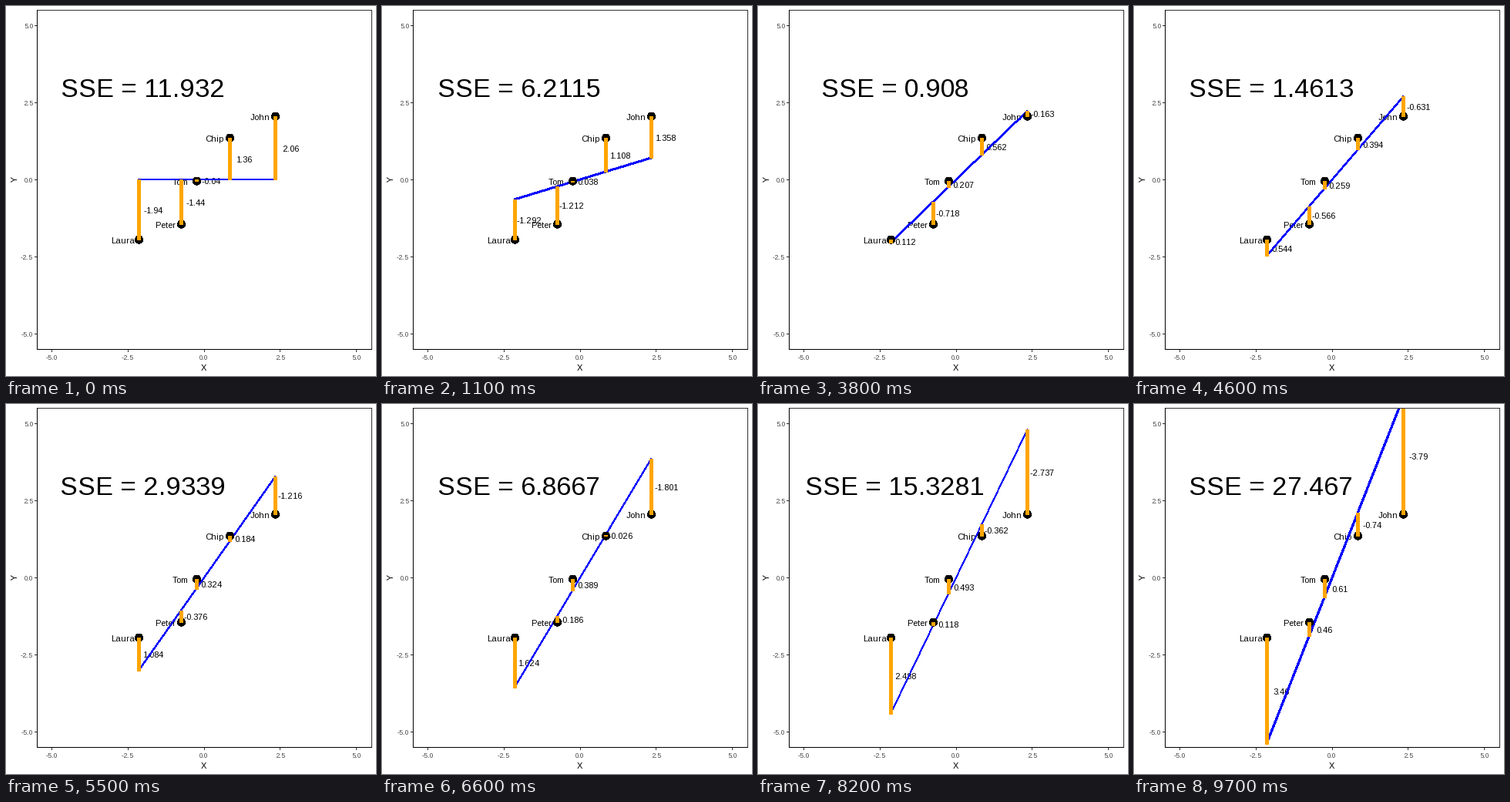
Recreate the animation shown at these times as a matplotlib script. Size 480 by 480 pixels, loop 10 s.

```python
import matplotlib.pyplot as plt
import numpy as np
from matplotlib.animation import FuncAnimation
from matplotlib.patches import Circle, Rectangle

plt.rcParams["font.family"] = "Liberation Sans"
plt.rcParams["text.hinting"] = "force_autohint"
plt.rcParams["text.hinting_factor"] = 1

SIZE, DPI = 480, 72  # at 72 dpi one point is one pixel
NAMES = ["Laura", "Peter", "Tom", "Chip", "John"]
X = np.array([-2.16, -0.76, -0.26, 0.84, 2.34])
Y = np.array([-1.94, -1.44, -0.04, 1.36, 2.06])
LEFT, TOP, RIGHT, BOTTOM = 40.5, 5.5, 474.5, 445.5


def px(x):
    return 257.15 + 39.45 * x


def py(y):
    return 225.5 - 40 * y


def column(x):
    """Centre of the pixel column at x."""
    return round(px(x)) + 0.5


def short(value, digits):
    text = f"{value:.{digits}f}".rstrip("0").rstrip(".")
    return "0" if text == "-0" else text


fig = plt.figure(figsize=(SIZE / DPI, SIZE / DPI), dpi=DPI, facecolor="white")
ax = fig.add_axes([0, 0, 1, 1])
ax.set(xlim=(0, SIZE), ylim=(SIZE, 0))
ax.axis("off")
panel = Rectangle((LEFT, TOP), RIGHT - LEFT, BOTTOM - TOP, fc="none", ec="none")
ax.add_patch(panel)


def baseline(y, size):
    return y + 0.36 * size + 0.6


def label(x, y, text, size=11, color="black", ha="center"):
    return ax.text(x - 0.5, baseline(y, size), text, fontsize=size,
                   color=color, ha=ha, va="baseline", zorder=1)


def stroke(xs, ys, color, width, z):
    line, = ax.plot(xs, ys, color=color, lw=width, zorder=z, snap=False,
                    solid_capstyle="butt", antialiased=False)
    return line


# Panel frame and axes
GREY = "#333333"
stroke([LEFT, RIGHT], [TOP, TOP], GREY, 1, 5)
stroke([RIGHT, RIGHT], [TOP, BOTTOM], GREY, 1, 5)
stroke([LEFT, LEFT], [TOP - 0.5, BOTTOM + 0.5], "black", 1, 6)
stroke([LEFT - 0.5, RIGHT + 0.5], [BOTTOM, BOTTOM], "black", 1, 6)
for v in np.arange(-5, 5.1, 2.5):
    tx, ty = np.floor(px(v)) + 0.5, py(v)
    stroke([tx, tx], [BOTTOM + 0.5, BOTTOM + 3.5], GREY, 1, 5)
    stroke([LEFT - 3.5, LEFT - 0.5], [ty, ty], GREY, 1, 5)
    label(px(v), 455, f"{v:.1f}", 9, "#4d4d4d")
    label(35.5, ty, f"{v:.1f}", 9, "#4d4d4d", "right")
label(256.5, 468, "X")
ax.text(17, 225.5, "Y", fontsize=11, rotation=90, ha="right", va="center")

# Data points with names
for name, x, y in zip(NAMES, X, Y):
    label(px(x - 0.5), py(y), name)
    ax.add_patch(Circle((column(x), py(y)), 5, fc="black", ec="none",
                        antialiased=False, zorder=3))

# Moving parts
sse = label(px(-2), py(3), "", 34.1)
fit = stroke([], [], "blue", 2, 2)
bars = [stroke([], [], "orange", 5, 4) for _ in X]
gaps = [label(px(x + 0.5), 0, "") for x in X]
for artist in [fit, *bars]:
    artist.set_clip_path(panel)


def state_at(i):
    """Hold each state for three ticks with one halfway tick between;
    the last two states follow without a halfway tick."""
    if i >= 94:
        return 24 + (i - 94) // 3
    state, tick = divmod(i + 1, 4)
    return state + 0.5 * (tick == 3)


def total(slope):
    return ((Y - slope * X) ** 2).sum()


def draw(i):
    state = state_at(i)
    slope = 0.1 * state
    line_y = slope * X
    # The total jumps to the next state while the line is halfway
    sse.set_text("SSE = " + short(total(0.1 * np.ceil(state)), 4))
    fit.set_data([px(X[0]), px(X[-1])],
                 [py(line_y[0]) - 0.5, py(line_y[-1]) - 0.5])
    # The pen is two pixels tall, so steep lines look thinner unless clipped
    clipped = line_y[-1] > 5.5
    fit.set_linewidth(2 if clipped else 2 / np.hypot(1, slope))
    for bar, gap, x, y, ly in zip(bars, gaps, X, Y, line_y):
        bar.set_data([column(x)] * 2, [py(y), py(ly)])
        gap.set_text(short(y - ly, 3))
        gap.set_y(baseline(py((y + ly) / 2), 11))
    return [sse, fit, *bars, *gaps]


anim = FuncAnimation(fig, draw, frames=100, interval=100, repeat=True,
                     repeat_delay=0, blit=False)
plt.show()
```
